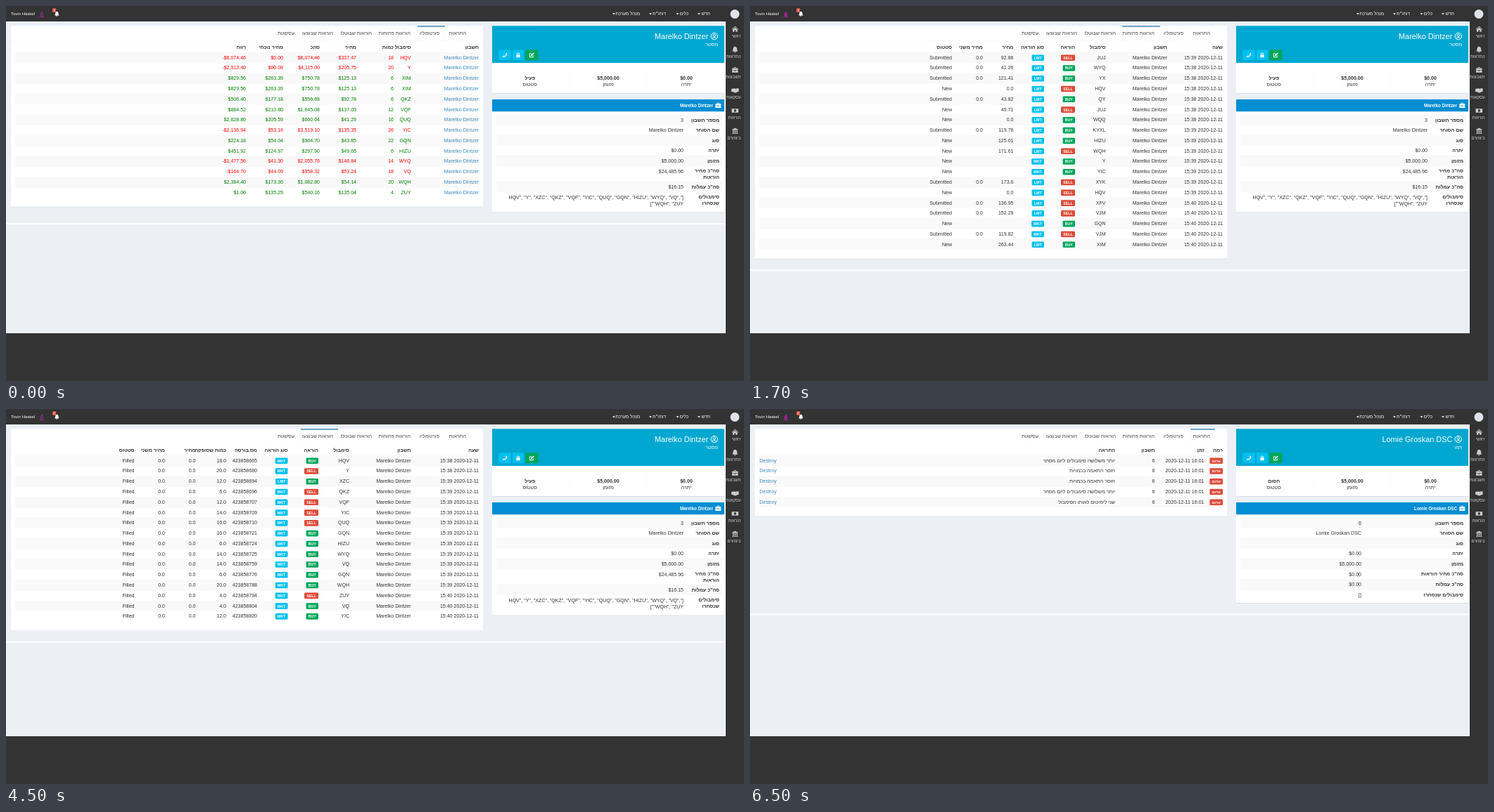
An HTML page that plays this animation: 1049x534 px, repeating every 8 s.

```html
<!DOCTYPE html>
<html>
<head>
<meta charset="utf-8">
<style>
html, body { margin: 0; width: 100%; height: 100%; overflow: hidden; background: #333; }
svg { display: block; width: 1049px; height: 534px; font: 7.05px "Liberation Sans", Arial, sans-serif; }
</style>
</head>
<body>
<svg id="stage" viewBox="0 0 1049 534"></svg>
<script>
const INK = '#333', LINK = '#3c8dbc', RED = '#dd4b39', AQUA = '#00c0ef', GREEN = '#00a65a';
const TOP = 66, ROW = 14.78;

const icons = {
  home: 'M-5 0L0-4.5 5 0 4.4.7 0-3.3-4.4.7zM-3.5.8L0-2.3 3.5.8V4H1V1.5H-1V4H-3.5z',
  bell: 'M0-4.5C-2.5-4-3-2-3 0-3 1.5-4 2-4 3H4C4 2 3 1.5 3 0 3-2 2.5-4 0-4.5zM-1.2 3.5H1.2A1.2 1.2 0 0 1-1.2 3.5z',
  case: 'M-1.8-2.5V-4H1.8V-2.5H4.5V.3H-4.5V-2.5zM-1-2.5H1V-3.2H-1zM-4.5.9H-1V1.8H1V.9H4.5V4H-4.5z',
  hands: 'M-5.5-2.5H-3L-1-3 1-2.2 3-3H5.5V2H4L1 3.8-1 3.5-4 2H-5.5z',
  money: 'M-5-3H5V3H-5zM0-2A1.6 2 0 0 0 0 2 1.6 2 0 0 0 0-2z',
  bank: 'M0-4.5L4.5-2.5V-1.7H-4.5V-2.5zM-3.5-1.2H-2V2.3H-3.5zM-.75-1.2H.75V2.3H-.75zM2-1.2H3.5V2.3H2zM-4.5 2.8H4.5V4H-4.5z',
  phone: 'M-3 1.5L-1 .6-.3 1.4Q1.2.6 1.8-.6L.9-1.4 1.8-3.2 3.3-2.8Q3.2 3-2.7 3.2z',
  lock: 'M-2.6-.4H2.6V3.4H-2.6zM-1.9-.4V-1.4A1.9 1.9 0 0 1 1.9-1.4V-.4H.9V-1.4A.9.9 0 0 0-.9-1.4V-.4z',
  edit: 'M-3.4-2.4H.6V-1.5H-2.5V2.5H1.5V.8L2.4 0V3.4H-3.4zM-1.4 1.4L-1.2 0 2.4-3.4 3.6-2.2 .1 1.2z',
  caret: 'M-2-1H2L0 1.1z'
};

const rect = (x, y, w, h, fill, r = 0) =>
  `<rect x="${x}" y="${y}" width="${w}" height="${h}" fill="${fill}" rx="${r}"/>`;

// y is the middle of the line; text ends at x unless another anchor is given
const text = (x, y, s, { fill = INK, size = 7.05, bold, anchor = 'end' } = {}) =>
  `<text x="${x}" y="${y + size * 0.355}" fill="${fill}" font-size="${size}" text-anchor="${anchor}"` +
  `${bold ? ' font-weight="700"' : ''}>${s}</text>`;

const icon = (name, x, y, fill = '#fff', scale = 1) =>
  `<path d="${icons[name]}" transform="translate(${x} ${y}) scale(${scale})" fill="${fill}" fill-rule="evenodd"/>`;

const box = (x, y, w, h) => rect(x, y + .7, w, h, '#dadee3', 1) + rect(x, y, w, h, '#fff', 1);

const badge = (label, fill, w) => (x, y) =>
  rect(x - w, y - 4, w, 8.6, fill, 1.4) +
  text(x - w / 2, y + .4, label, { fill: '#fff', size: 5.3, bold: true, anchor: 'middle' });

const cells = {
  S: badge('SELL', RED, 20), B: badge('BUY', GREEN, 17.4),
  L: badge('LMT', AQUA, 17.4), M: badge('MKT', AQUA, 17.8),
  red: badge('אדום', RED, 18.6)
};

const stripes = (x, w, edges) => edges.slice(1).map((end, i) =>
  rect(x, edges[i], w, end - edges[i], i % 2 ? '#fff' : '#f9f9f9') +
  rect(x, edges[i], w, .5, '#f4f4f4')).join('');

const tabs = [
  ['התראות', 654, 626, 35], ['פורטפוליו', 616, 585, 39], ['הוראות פתוחות', 575, 529, 54],
  ['הוראות שבוטלו', 520, 474, 53], ['הוראות שבוצעו', 465, 419, 53], ['עסקאות', 410]
];

const split = s => s.trim().split('\n').map(line => line.trim().split(' '));
const time = minute => `15:${minute} 2020-12-11`;
const trader = { name: 'Marelko Dintzer', kind: 'מסטר', state: 'פעיל', id: 3, right: 963, wraps: true };
const blocked = { name: 'Lomie Groskan DSC', kind: 'דמו', state: 'חסום', id: 6, right: 869 };

const holdings = split(`
  HQV 18 337.47 6,074.46 0.00 -6,074.46
  Y 20 205.75 4,115.00 60.08 -2,913.40
  XIM 6 125.13 750.78 263.39 829.56
  XIM 6 125.13 750.78 263.39 829.56
  QKZ 6 92.78 556.68 177.18 506.40
  VQF 12 137.09 1,645.08 210.80 884.52
  QUQ 16 41.29 660.64 205.59 2,628.80
  YIC 26 135.35 3,519.10 53.16 -2,136.94
  GQN 22 43.85 964.70 54.04 224.18
  HIZU 6 49.65 297.90 124.97 451.92
  WYQ 14 146.84 2,055.76 41.30 -1,477.56
  VQ 18 53.24 958.32 44.09 -164.70
  WQH 20 54.14 1,082.80 173.36 2,384.40
  ZUY 4 135.04 540.16 135.29 1.00`);

const open = split(`
  39 JUJ S L 92.86 0.0
  38 WYQ B L 41.26 0.0
  38 YX B L 121.41 0.0
  38 HQV S L 0.0
  38 QY B L 43.82 0.0
  38 JUJ S L 49.71
  38 WQQ B L 0.0
  39 KYXL B L 119.76 0.0
  39 HIZU B L 125.01
  39 WQH S L 171.61
  39 Y B M
  39 YIC B M
  39 XYK S L 173.6 0.0
  39 HQV S L 0.0
  40 XFV S L 136.95 0.0
  40 VJM S L 152.29 0.0
  40 GQN B M
  40 VJM S M 119.82 0.0
  40 XIM B L 263.44`);

const cancelled = split(`
  38 XIM B L 656 264.86
  38 XMU B L 675 207.06
  38 UZK B L 679 232.82
  39 UH S L 691 239.69
  39 ZX B L 695 337.87
  39 XQ S L 698 41.22
  39 Y S L 744 60.07
  39 XQ S M 746 125.01
  40 HIZU B L 814 125.01`);

const filled = split(`
  38 HQV B M 665 18
  38 Y S M 680 20
  39 XZC B L 694 12
  39 QKZ S M 696 6
  39 VQF S M 707 12
  39 YIC S M 709 14
  39 QUQ S M 710 16
  39 GQN B M 721 16
  39 HIZU B M 724 6
  39 WYQ B M 725 14
  39 VQ B M 759 14
  39 GQN B M 776 6
  39 WQH B M 788 20
  40 ZUY S M 794 4
  40 VQ B M 804 4
  40 YIC B M 820 12`);

const alerts = ['יותר משלושה סימבולים ליום מסחר', 'חוסר התאמה בכמויות', 'חוסר התאמה בכמויות',
  'יותר משלושה סימבולים ליום מסחר', 'שני לימיטים לאותו הסימבול'];

const dollars = s => s[0] === '-' ? '-$' + s.slice(1) : '$' + s;
const orderHeads = ['שעה', 'חשבון', 'סימבול', 'הוראה', 'סוג הוראה'];

const views = [
  {
    start: 0, tab: 1, who: trader,
    cols: [672, 575.5, 551, 498, 446, 394, 341],
    heads: ['חשבון', 'סימבול', 'כמות', 'מחיר', 'סהכ', 'מחיר נוכחי', 'רווח'],
    rows: holdings.map(([sym, qty, ...sums]) => [trader.name, sym, qty, ...sums.map(dollars)]),
    color: (row, i) => i === 0 ? LINK : row[6][0] === '-' ? '#f00' : '#008000'
  },
  {
    start: 500, tab: 2, who: trader,
    cols: [672, 593, 505.5, 462, 418, 374.5, 331, 287],
    heads: [...orderHeads, 'מחיר', 'מחיר משני', 'סטטוס'],
    rows: open.map(([min, sym, side, type, price = '', second = '']) =>
      [time(min), trader.name, sym, side, type, price, second, second ? 'Submitted' : 'New'])
  },
  {
    start: 2500, tab: 3, who: trader,
    cols: [672, 575.5, 488, 444, 400.5, 357, 313, 269.5, 226],
    heads: [...orderHeads, 'מס.בורסה', 'מחיר', 'מחיר משני', 'סטטוס'],
    rows: cancelled.map(([min, sym, side, type, id, price]) =>
      [time(min), trader.name, sym, side, type, '423858' + id, price, '0.0', 'Cancelled'])
  },
  {
    start: 4500, tab: 4, who: trader,
    cols: [672, 575.5, 488, 444, 400.5, 357, 313, 269.5, 226, 182.5],
    heads: [...orderHeads, 'מס.בורסה', 'כמות שסופקה', 'מחיר', 'מחיר משני', 'סטטוס'],
    rows: filled.map(([min, sym, side, type, id, qty]) =>
      [time(min), trader.name, sym, side, type, '423858' + id, qty + '.0', '0.0', '0.0', 'Filled'])
  },
  {
    start: 6500, tab: 0, who: blocked,
    cols: [672, 645.5, 575.5, 519, 37.7],
    heads: ['רמה', 'זמן', 'חשבון', 'התראה', ''],
    rows: alerts.map(s => ['red', '2020-12-11 16:01', '6', s, 'Destroy']),
    color: (row, i) => i === 4 ? LINK : INK
  }
];

function frame() {
  const menu = [['חדש', 1001, 985], ['כלים', 970, 954.5], ['דוחו״ת', 938, 916], ['מנהל מערכת', 901, 864]];
  const side = [['home', 'ראשי'], ['bell', 'התראות'], ['case', 'חשבונות'],
    ['hands', 'עסקאות'], ['money', 'הוראות'], ['bank', 'ביצועים']];
  return rect(0, 0, 1049, 534, '#333') + rect(0, 22, 1023, 444, '#ecf0f5') +
    text(7, 11, 'Tovin Haskel', { fill: '#fff', size: 6, anchor: 'start' }) +
    icon('bell', 72.3, 11.2, '#fff', .75) + rect(66, 3.3, 5.2, 5.8, RED, 1) +
    text(68.6, 6.2, '8', { fill: '#fff', size: 4.5, anchor: 'middle' }) +
    menu.map(([s, x, caret]) => text(x, 11, s, { fill: '#fff', size: 6.3 }) + icon('caret', caret, 11.3)).join('') +
    '<circle cx="1036" cy="11.5" r="6.5" fill="#dfe2ea"/>' +
    side.map(([name, s], i) => icon(name, 1036.3, 33 + i * 29, '#ccc', .95) +
      text(1044.5, 42.7 + i * 29, s, { fill: '#ccc', size: 6 })).join('');
}

function table({ tab, cols, heads, rows, color = () => INK }) {
  const bottom = TOP + rows.length * ROW;
  const [, , tabX, tabW] = tabs[tab];
  const edges = Array.from({ length: rows.length + 1 }, (_, i) => TOP + i * ROW);
  return box(7, 28.3, 671, bottom + 12.9 - 28.3) + rect(7, 49, 671, .5, '#f4f4f4') +
    rect(tabX, 28.3, tabW, 21.2, '#f4f4f4') + rect(tabX + .5, 28.3, tabW - 1, 21.2, '#fff') +
    rect(tabX, 28.2, tabW, 1.5, LINK) +
    tabs.map(([s, x]) => text(x, 38.6, s, { fill: '#444' })).join('') +
    stripes(13, 659, edges) +
    heads.map((s, i) => text(cols[i], 58.7, s, { bold: true })).join('') +
    rows.map((row, r) => row.map((s, i) => {
      const y = TOP + (r + .5) * ROW;
      return cells[s] ? cells[s](cols[i], y) : text(cols[i], y - .2, s, { fill: color(row, i) });
    }).join('')).join('');
}

function account({ name, kind, state, id, right, wraps }) {
  const white = { fill: '#fff' };
  const end = wraps ? 293.5 : 276;
  const labels = ['מספר חשבון', 'שם הסוחר', 'סוג', 'יתרה', 'מזומן',
    ...(wraps ? ['סה"כ מחיר|הוראות', 'סה"כ עמלות', 'סימבולים|שנסחרו']
      : ['סה"כ מחיר הוראות', 'סה"כ עמלות', 'סימבולים שנסחרו'])];
  const symbols = 'HQV", "Y", "XZC", "QKZ", "VQF", "YIC", "QUQ", "GQN", "HIZU", "WYQ", "VQ","]|[""WQH", "ZUY';
  const values = [id, name, '', '$0.00', '$5,000.00',
    ...(wraps ? ['$24,485.96', '$16.15', symbols] : ['$0.00', '$0.00', '[]'])];
  const ys = [162, 176.6, 191, 205.3, 220, 234.8, ...(wraps ? [257.2, 271.8] : [249.6, 264.6])];
  const lines = (x, y, s, gap, style) =>
    String(s).split('|').map((part, i) => text(x, y + i * gap, part, style)).join('');
  const stats = [[967, '$0.00', 'יתרה'], [856, '$5,000.00', 'מזומן'], [744.7, state, 'סטטוס']];
  const buttons = [[700, 18, AQUA, 'phone'], [720, 16, AQUA, 'lock'], [738, 18.6, GREEN, 'edit']];

  return box(691, 28.3, 330, 95.7) + rect(691, 28.3, 330, 52.7, '#00a7d0', 1) +
    text(998.3, 43.3, name, { fill: '#fff', size: 10.9 }) + text(1012, 54.6, kind, white) +
    '<g fill="none" stroke="#fff"><circle cx="1006.8" cy="43" r="4.7"/><circle cx="1006.8" cy="41.7" r="1.7"/>' +
    '<path d="M1003.7 46.2Q1006.8 42.6 1009.9 46.2"/></g>' +
    buttons.map(([x, w, fill, name]) => rect(x, 62.3, w, 15, fill, 1.5) + icon(name, x + w / 2, 69.8)).join('') +
    rect(800, 92, .5, 26, '#f4f4f4') + rect(911, 92, .5, 26, '#f4f4f4') +
    stats.map(([x, s, label]) => text(x, 102.4, s, { bold: true, anchor: 'middle' }) +
      text(x, 111, label, { anchor: 'middle' })).join('') +
    box(691, 133, 330, end - 133) + rect(691, 133, 330, 17.3, '#038dd3', 1) +
    text(1005, 141.6, name, { fill: '#fff', size: 6.3, bold: true }) + icon('case', 1012.3, 141.4, '#fff', .9) +
    stripes(697, 321, [...ys.map(y => y - 7.2), end - 4]) +
    labels.map((s, i) => lines(1014, ys[i], s, 8.8, { bold: true })).join('') +
    values.map((s, i) => lines(right, ys[i] + .2, s, 9.8)).join('') +
    rect(0, Math.max(end, 0) + 15.7, 0, 0, '#fff');
}

function footer({ rows, who }) {
  const y = Math.max(TOP + rows.length * ROW + 12.9, who.wraps ? 293.5 : 276) + 15.6;
  return rect(0, y, 1023, 1.8, '#fff');
}

function marker(solid) {
  return `<path d="M51 8.2Q48.7 11.3 49.3 14H52.7Q53.3 11.3 51 8.2zM47.5 15.4H54.3" ` +
    `fill="${solid ? '#9c1f93' : 'none'}" stroke="#a8249c" stroke-width="1"/>`;
}

const stage = document.getElementById('stage');
stage.innerHTML = frame() + views.map((view, i) =>
  `<g class="view">${footer(view)}${table(view)}${account(view.who)}${marker(i === 1 || i === 4)}</g>`).join('');
const layers = stage.querySelectorAll('.view');

function tick() {
  const t = performance.now() % 8000;
  const current = views.filter(view => view.start <= t).length - 1;
  layers.forEach((layer, i) => layer.setAttribute('display', i === current ? 'inline' : 'none'));
  requestAnimationFrame(tick);
}
tick();
</script>
</body>
</html>
```
